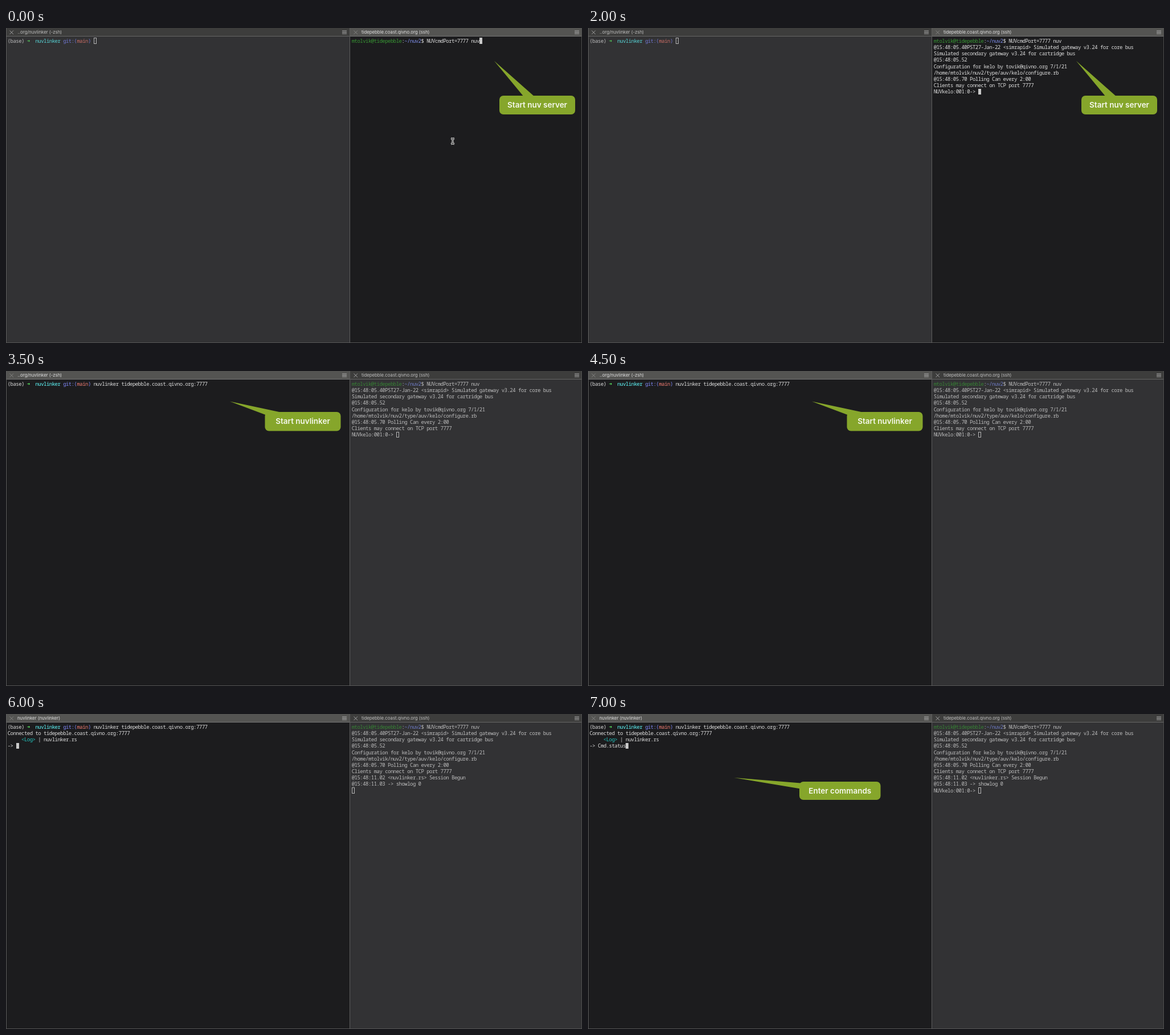
Recreate the animation shown at these times as an HTML page with a canvas. Size 1011 by 554 pixels, loop 8000 ms.

```html
<!DOCTYPE html>
<html lang="en">
<head>
<meta charset="utf-8">
<style>
html, body { margin: 0; width: 100%; height: 100%; overflow: hidden; background: #1c1c1e; }
canvas { display: block; }
</style>
</head>
<body>
<canvas id="stage" width="1011" height="554"></canvas>
<script>
const ctx = document.getElementById('stage').getContext('2d');
const LOOP = 8000, COL = 4.87, ROW = 11.16;
const MONO = '9px "Noto Sans Mono", "DejaVu Sans Mono", monospace';
const TITLE = '7.8px Inter, "Liberation Sans", sans-serif';
const LABEL = '600 13.5px Inter, "Open Sans", sans-serif';
const WHITE = '#dedede', GREEN = '#389634', BLUE = '#8090ee', TEAL = '#22c2bb';
const HOST = 'tidepebble.coast.qivno.org';

// A line is a list of [text, colour] runs.
const plain = text => [[text, WHITE]];
const shellPrompt = [['(base) ', WHITE], ['➜', '#5ffa68'], ['  nuvlinker ', '#60fdff'],
  ['git:(', '#7f86f5'], ['main', '#f07c72'], [') ', '#7f86f5']];
const launch = [...shellPrompt, [`nuvlinker ${HOST}:7777 `, WHITE]];
const serverStart = [['mtolvik@tidepebble', GREEN], [':', WHITE], ['~/nuv2', BLUE],
  ['$ NUVcmdPort=7777 nuv', WHITE]];
const serverLog = [
  '@15:48:05.40PST27-Jan-22 <simrapid> Simulated gateway v3.24 for core bus',
  'Simulated secondary gateway v3.24 for cartridge bus',
  '@15:48:05.52',
  'Configuration for kelo by tovik@qivno.org 7/1/21',
  '/home/mtolvik/nuv2/type/auv/kelo/configure.rb',
  '@15:48:05.70 Polling Can every 2:00',
  'Clients may connect on TCP port 7777'
].map(plain);
const sessionLog = ['@15:48:11.02 <nuvlinker.rs> Session Begun', '@15:48:11.03 -> showlog 0'].map(plain);
const serverPrompt = plain('NUVkelo:001:0-> ');

function rect(x, y, w, h, color) {
  ctx.fillStyle = color;
  ctx.fillRect(x, y, w, h);
}

function path(points, color, width) {
  ctx.beginPath();
  points.forEach(([x, y], i) => i ? ctx.lineTo(x, y) : ctx.moveTo(x, y));
  ctx.strokeStyle = color;
  ctx.lineWidth = width;
  ctx.stroke();
}

function words(text, x, y, font, color, align = 'left') {
  ctx.font = font;
  ctx.textAlign = align;
  ctx.fillStyle = color;
  ctx.fillText(text, x, y);
}

function line(runs, x, row) {
  const y = 26 + row * ROW;
  let col = 0;
  for (const [text, color] of runs)
    for (const ch of text) words(ch, x + (col++ + .5) * COL, y, MONO, color, 'center');
  return col;
}

function cursor(left, row, active) {
  const x = Math.round(left), top = 17.3 + row * ROW;
  const y = Math.round(top), h = Math.round(top + 10.7) - y;
  if (active) return rect(x, y, 5, h, '#c9c9c9');
  ctx.strokeStyle = '#d8d8d8';
  ctx.lineWidth = 1;
  ctx.strokeRect(x + .5, y + .5, 4, h - 1);
}

function pane({ x, w, title, titleX, lines, active, blink = true }) {
  rect(x, 0, w, 554, active ? '#1c1c1e' : '#323234');
  rect(x, 0, w, 14, active ? '#545452' : '#3d3d3c');
  rect(x, 14, w, 1, active ? '#747474' : '#666666');

  const cross = active ? '#868684' : '#a8a8a8';
  path([[x + 6.5, 4.5], [x + 13, 11]], cross, .9);
  path([[x + 13, 4.5], [x + 6.5, 11]], cross, .9);
  for (const y of [5, 7.5, 10]) path([[x + w - 13, y], [x + w - 5, y]], '#adadad', 1);
  words(title, titleX, 10.3, TITLE, active ? '#e0e0e0' : '#c0c0c0');

  ctx.globalAlpha = active ? 1 : .8;
  let end = 0;
  lines.forEach((runs, row) => { end = line(runs, x + 3, row); });
  if (blink) cursor(x + 3 + end * COL, lines.length - 1, active);
  ctx.globalAlpha = 1;
}

// tail: the tip, then the two points where it meets the box
function callout(text, x, y, w, h, tail) {
  ctx.fillStyle = '#86a62b';
  ctx.beginPath();
  ctx.roundRect(x, y, w, h, 7);
  ctx.fill();
  ctx.beginPath();
  tail.forEach(([px, py]) => ctx.lineTo(px, py));
  ctx.fill();
  words(text, x + w / 2, y + 20.5, LABEL, '#f6f8ee', 'center');
}

function pointer(x, y) {
  for (const [color, width] of [['#e8e8e8', 3], ['#222222', 1]]) {
    path([[x - 3, y - 5], [x, y - 4], [x + 3, y - 5]], color, width);
    path([[x - 3, y + 5], [x, y + 4], [x + 3, y + 5]], color, width);
    path([[x, y - 5], [x, y + 5]], color, width);
  }
}

function leftLines(t) {
  if (t < 3500) return [shellPrompt];
  if (t < 5000) return [launch];
  return [launch, plain(`Connected to ${HOST}:7777`),
    [['     <Log>', TEAL], [' | nuvlinker.rs', WHITE]],
    plain(t < 7000 ? '-> ' : '-> Cmd.status')];
}

function rightLines(t) {
  if (t < 1500) return [serverStart];
  if (t < 2000) return [serverStart, plain('')];
  const log = [serverStart, ...serverLog];
  if (t < 5000) return [...log, serverPrompt];
  return [...log, ...sessionLog, t < 6500 ? plain('') : serverPrompt];
}

function draw(t) {
  const within = (from, to) => t >= from && t < to;
  const leftActive = t >= 3500;
  pane({
    x: 0, w: 603, active: leftActive, lines: leftLines(t),
    title: t < 5000 ? '..org/nuvlinker (-zsh)' : t < 5500 ? 'nuvlinker (-zsh)' : 'nuvlinker (nuvlinker)',
    titleX: t < 5000 ? 20.5 : 20,
    blink: !within(3500, 4000) && !within(4500, 5000) && !within(6500, 7000)
  });
  pane({
    x: 604, w: 407, active: !leftActive, lines: rightLines(t),
    title: HOST + ' (ssh)', titleX: 624, blink: !within(500, 1000)
  });
  rect(603, 0, 1, 554, '#5c5c5c');
  rect(0, 0, 1, 554, '#5c5c5c');
  rect(1010, 0, 1, 554, '#4c4c4c');
  rect(0, 553, 1011, 1, '#555555');

  if (t < 1500) pointer(784, 199);
  if (t < 3000) callout('Start nuv server', 866, 119, 133, 33, [[857, 58], [909, 121], [928, 121]]);
  if (within(3500, 6000)) callout('Start nuvlinker', 454.5, 72, 133, 33.5, [[393, 53.5], [458, 78], [484, 73]]);
  if (t >= 6500) callout('Enter commands', 371, 119, 142.5, 32, [[256.5, 112], [373, 131.5], [373, 121.5]]);
}

function tick(now) {
  draw(now % LOOP);
  requestAnimationFrame(tick);
}
requestAnimationFrame(tick);
</script>
</body>
</html>
```
